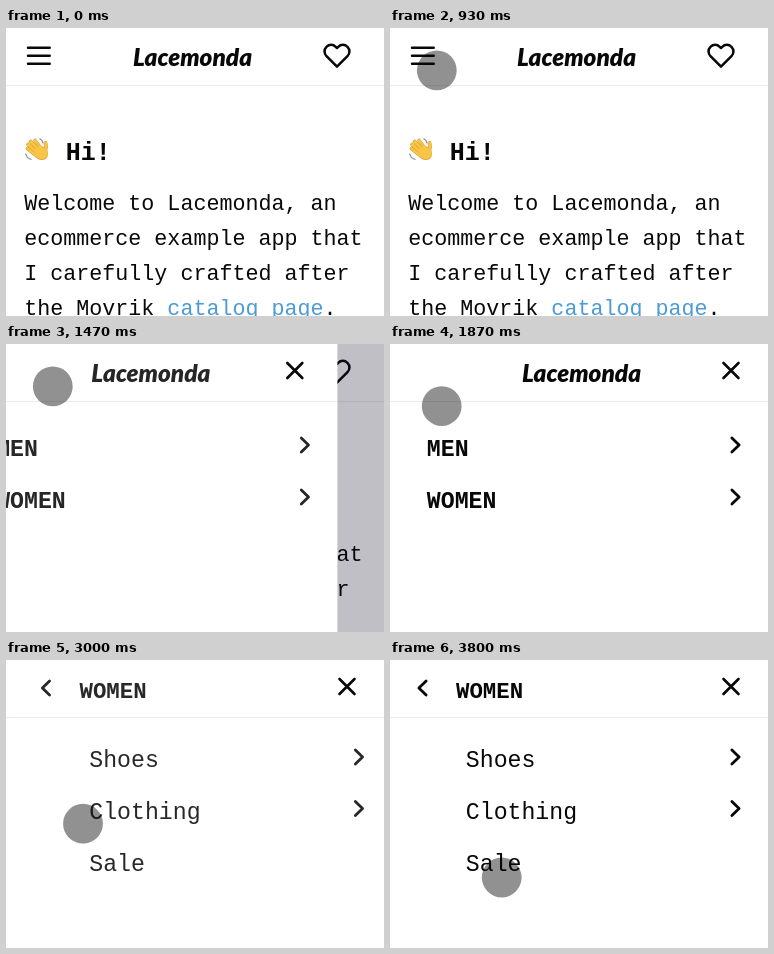
Recreate the animation shown at these times as an HTML page with a canvas. Size 378 by 288 pixels, loop 3990 ms.

```html
<!DOCTYPE html>
<html lang="en">
<head>
<meta charset="utf-8">
<title>Shop menu</title>
<style>
html, body { margin: 0; width: 100%; height: 100%; overflow: hidden; background: #fff; }
canvas { display: block; width: 378px; height: 288px; }
</style>
</head>
<body>
<canvas id="stage"></canvas>
<script>
const W = 378, H = 288, LOOP = 3990, STEPS = 60;
const MONO = '"Liberation Mono", "DejaVu Sans Mono", monospace';
const BRAND = 'Lacemonda';
const INK = '#080808';

const canvas = document.getElementById('stage');
const ctx = canvas.getContext('2d');
const dpr = window.devicePixelRatio || 1;
canvas.width = W * dpr;
canvas.height = H * dpr;

const clamp = v => Math.max(0, Math.min(1, v));
const easeOut = p => 1 - (1 - p) ** 3;

// Remaining distance (1 to 0) of a critically damped spring.
function spring(age, rate) {
  const x = Math.max(0, age) * rate;
  return (1 + x) * Math.exp(-x);
}

function text(str, x, y, size, bold, color = INK) {
  ctx.font = `${bold ? 'bold ' : ''}${size}px ${MONO}`;
  ctx.textAlign = 'left';
  ctx.fillStyle = color;
  ctx.fillText(str, x, y);
}

function line(points, width = 2.6, color = INK) {
  ctx.beginPath();
  points.forEach(([x, y]) => ctx.lineTo(x, y));
  ctx.lineWidth = width;
  ctx.strokeStyle = color;
  ctx.lineCap = ctx.lineJoin = 'round';
  ctx.stroke();
}

function brand(cx) {
  ctx.font = 'italic 900 24.3px Lato, sans-serif';
  ctx.textAlign = 'center';
  ctx.fillStyle = INK;
  ctx.fillText(BRAND, cx, 38);
}

function chevron(cx, cy, dir) {
  const d = 3.6 * dir;
  line([[cx - d, cy - 7], [cx + d, cy], [cx - d, cy + 7]], 2.8);
}

function cross(cx, cy) {
  line([[cx - 7.5, cy - 7.5], [cx + 7.5, cy + 7.5]]);
  line([[cx + 7.5, cy - 7.5], [cx - 7.5, cy + 7.5]]);
}

function divider() {
  ctx.fillStyle = '#ebebeb';
  ctx.fillRect(0, 57, W, 1);
}

function panel() {
  ctx.fillStyle = '#fff';
  ctx.fillRect(0, 0, W, H);
}

const heartShape = new Path2D('M20.84 4.61a5.5 5.5 0 0 0-7.78 0L12 5.67l-1.06-1.06' +
  'a5.5 5.5 0 0 0-7.78 7.78L12 21.23l8.84-8.84a5.5 5.5 0 0 0 0-7.78z');

function heart() {
  ctx.save();
  ctx.translate(316.7, 13.3);
  ctx.scale(1.19, 1.19);
  ctx.lineWidth = 2.1;
  ctx.strokeStyle = INK;
  ctx.lineJoin = 'round';
  ctx.stroke(heartShape);
  ctx.restore();
}

function wave() {
  const tips = [[21.5, 120.5], [22, 116.5], [24.5, 113.5], [29, 112.5]];
  for (const [grow, color] of [[1, '#d8982a'], [0, '#f8c546']]) {
    tips.forEach(([x, y], i) => line([[x, y], [31 + i * 1.8, 128 - i * 2]], 2.6 + grow, color));
    line([[39.5, 115], [40, 119], [39, 125]], 2.8 + grow, color);
    ctx.beginPath();
    ctx.ellipse(35, 125, 6 + grow / 2, 7 + grow / 2, -0.7, 0, 7);
    ctx.fillStyle = color;
    ctx.fill();
  }
  line([[34, 111], [36, 112.5], [37, 115]], 1.3, '#8b9aa3');
  line([[19.5, 126], [21.5, 129.5], [25, 131.5]], 1.3, '#8b9aa3');
}

function page() {
  panel();
  divider();
  for (const y of [19.7, 27.7, 35.7]) line([[22, y], [43.7, y]], 2.5);
  brand(186.5);
  heart();
  wave();
  text('Hi!', 59.7, 131.5, 25, true);
  const x = 18.2, size = 21.7;
  text(`Welcome to ${BRAND}, an`, x, 182, size);
  text('ecommerce example app that', x, 217, size);
  text('I carefully crafted after', x, 252, size);
  text('the Movrik', x, 287, size);
  const step = ctx.measureText('0').width;
  text('catalog page', x + 11 * step, 287, size, false, '#4c9bd8');
  text('.', x + 23 * step, 287, size);
}

function menu(t) {
  let shift = -W * spring(t - 1182, 0.0129);
  if (shift > -4) shift = 0;
  ctx.fillStyle = 'rgba(0,0,24,0.25)';
  ctx.fillRect(0, 0, W, H);
  ctx.save();
  ctx.translate(shift, 0);
  panel();
  divider();
  ctx.globalAlpha = clamp((t - 1182) / 320);
  brand(191.5);
  text('MEN', 36.8, 111.5, 23.2, true);
  text('WOMEN', 36.8, 163.5, 23.2, true);
  chevron(345.5, 101, 1);
  chevron(345.5, 153, 1);
  ctx.restore();
  if (t > 2710) submenu(t);
  cross(341 + shift * 1.12, 26.5);
}

function submenu(t) {
  ctx.save();
  ctx.translate(W * spring(t - 2705, 0.02035), 0);
  panel();
  divider();
  ctx.globalAlpha = clamp((t - 2705) / 330);
  chevron(32.5, 28, -1);
  text('WOMEN', 66, 37.5, 22.4, true);
  ['Shoes', 'Clothing', 'Sale'].forEach((s, i) => text(s, 75.8, 106.5 + 52 * i, 23.2));
  chevron(345.5, 97, 1);
  chevron(345.5, 148.5, 1);
  ctx.restore();
}

// Pointer moves: start, duration, destination.
const moves = [[45, 885, 46.8, 42.4], [1830, 560, 77, 163.7], [3230, 560, 111.7, 217.5]];

function pointer(t) {
  let x = 315, y = 306;
  for (const [start, span, tx, ty] of moves) {
    const p = easeOut(clamp((t - start) / span));
    x += (tx - x) * p;
    y += (ty - y) * p;
  }
  const ripple = t >= 1190 ? clamp(1 - (t - 1190) / 120) : 0;
  ctx.beginPath();
  ctx.arc(x, y, 22.5, 0, 7);
  ctx.lineWidth = 5;
  ctx.strokeStyle = `rgba(255,255,255,${0.6 * ripple})`;
  ctx.stroke();
  ctx.beginPath();
  ctx.arc(x, y, 19.9, 0, 7);
  ctx.fillStyle = 'rgba(0,0,0,0.43)';
  ctx.fill();
}

function draw(now) {
  // The picture advances in even steps of a fifteenth of a second.
  const step = Math.floor((now % LOOP) / LOOP * STEPS + 0.1) % STEPS;
  const t = step * LOOP / STEPS;
  ctx.setTransform(dpr, 0, 0, dpr, 0, 0);
  page();
  if (t > 1190) menu(t);
  if (t > 60) pointer(t);
}

const begin = performance.now();
function tick() {
  draw(performance.now() - begin);
  requestAnimationFrame(tick);
}
tick();
</script>
</body>
</html>
```
